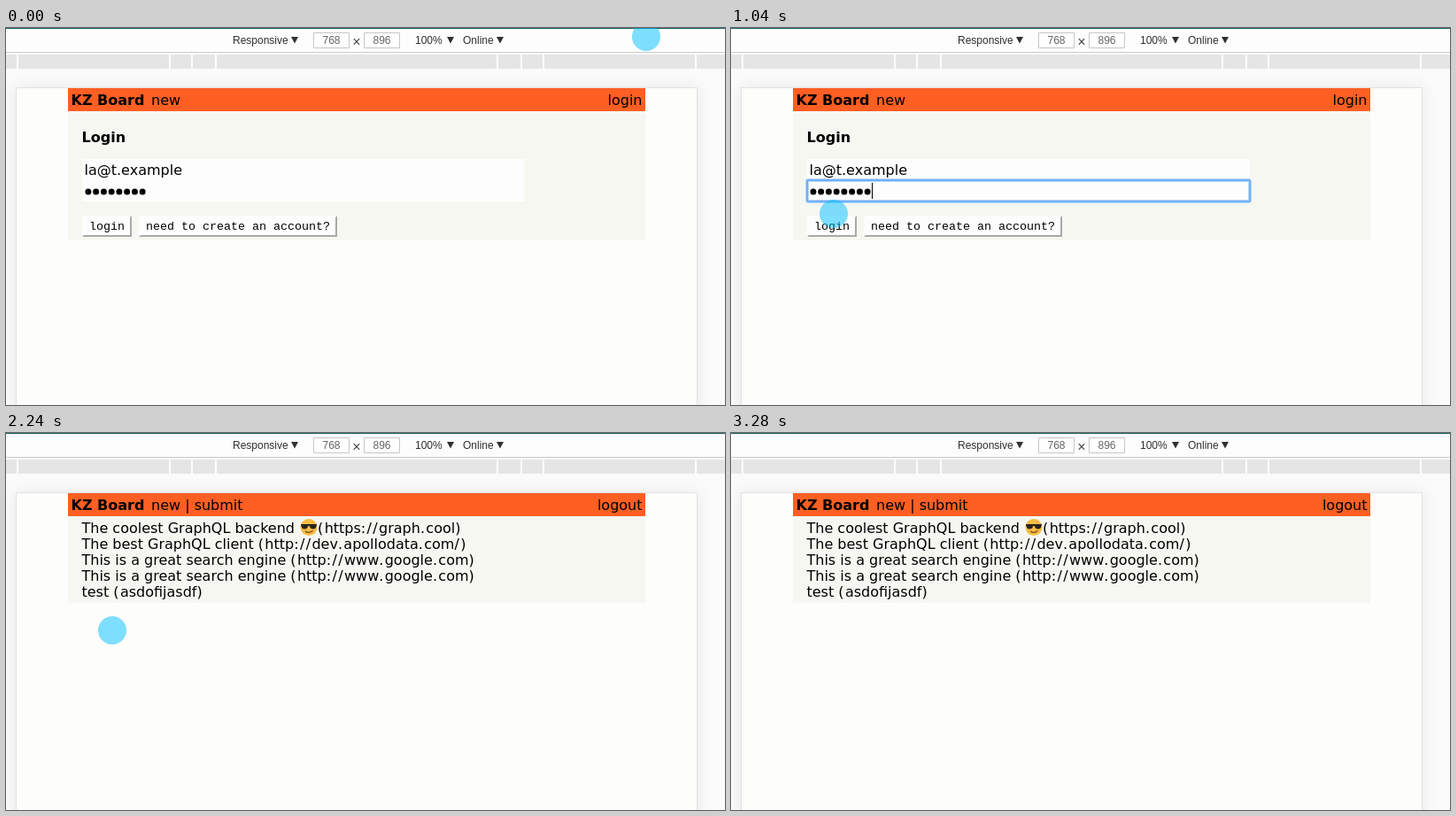
Write an HTML page that moves like this. It is 812 px wide and 426 px high and loops after 3.92 s.

```html
<!DOCTYPE html>
<html lang="en">
<head>
<meta charset="utf-8">
<title>Login demo</title>
<style>
  html, body { margin: 0; width: 100%; height: 100%; overflow: hidden; background: #fbfbfb; }
  svg { display: block; width: 812px; height: 426px; }
  text { font: 16px "DejaVu Sans", sans-serif; white-space: pre; }
  .bold { font-weight: bold; }
  .end { text-anchor: end; }
  .mark { letter-spacing: 1.35px; }
  .bar text { font: 12px "Liberation Sans", Arial, sans-serif; fill: #303030; }
  .bar .size { fill: #666; text-anchor: middle; }
  .bar .times { font-size: 16px; fill: #444; text-anchor: middle; }
  .button text { font: 13.333px "Liberation Mono", monospace; }
  .device { fill: #fdfdfb; stroke: #e2e2e2; filter: drop-shadow(0 0 9px rgba(0, 0, 0, .08)); }
  .solid { fill: rgba(0, 191, 255, .5); }
  .ring { fill: none; stroke: rgba(0, 191, 255, .3); stroke-width: 2.5px; }
</style>
</head>
<body>
<svg viewBox="0 0 812 426">
  <rect width="812" height="426" fill="#fbfbfb"/>
  <rect class="device" x="11.5" y="67.5" width="769" height="420"/>

  <g class="bar">
    <rect width="812" height="46" fill="#fdfdfd"/>
    <rect width="812" height="1" fill="#1d6670"/>
    <rect y="27" width="812" height="1" fill="#cbcbcb"/>
    <rect y="30" width="812" height="16" fill="#e5e5e5"/>
    <g id="ticks" fill="#fdfdfd"></g>
    <text x="256" y="18">Responsive</text>
    <text x="462" y="18">100%</text>
    <text x="516" y="18">Online</text>
    <path d="M322 10h8l-4 7.5zM498 10h8l-4 7.5zM554 10h8l-4 7.5z" fill="#303030"/>
    <path d="M347.5 5.5h40v17h-40zM404.5 5.5h40v17h-40z" fill="#fff" stroke="#c6c6c6"/>
    <text class="size" x="367.5" y="18">768</text>
    <text class="times" x="396" y="21">×</text>
    <text class="size" x="424.5" y="18">896</text>
  </g>

  <rect x="70" y="68" width="652" height="26" fill="#ff5f22"/>
  <text class="bold" x="73.5" y="87">KZ Board</text>

  <g id="form">
    <text x="164" y="87">new</text>
    <text class="end" x="718.5" y="87">login</text>
    <rect x="70" y="94" width="652" height="146" fill="#f7f7f2"/>
    <text class="bold" x="85.5" y="129">Login</text>
    <rect x="86" y="148" width="500" height="48" fill="#fdfdfd"/>
    <text x="88.5" y="166">la@t.example</text>
    <g id="focus">
      <rect x="86" y="172" width="500" height="24" rx="1.5" fill="#fdfdfd" stroke="#b5d6fb" stroke-width="4"/>
      <rect x="86" y="172" width="500" height="24" rx="1" fill="none" stroke="#70b0f6" stroke-width="2"/>
      <rect x="159" y="175" width="1" height="18"/>
    </g>
    <g id="dots"></g>
    <g id="buttons" class="button"></g>
  </g>

  <g id="list">
    <text x="164" y="87">new | submit</text>
    <text class="end" x="718.5" y="87">logout</text>
    <rect x="70" y="94" width="652" height="98" fill="#f7f7f2"/>
    <g id="links"></g>
    <g transform="translate(342 106.5)">
      <circle r="9.5" fill="#f5bd45"/>
      <path d="M-9-3.500H9Q8.500 2 5 2T.8-1.500H-.8Q-1.500 2-5 2T-9-3.500Z" fill="#2a2420"/>
      <path d="M-4 4.500Q0 7.500 4.500 4" fill="none" stroke="#7b4a12" stroke-width="1.3"/>
    </g>
  </g>

  <circle id="pointer"/>
</svg>
<script>
  const LOOP = 3920, STEP = 80, CLICK_LENGTH = 240;
  const FIELD_CLICK = 640, BUTTON_CLICK = 1440, PAGE_CHANGE = 2240;
  const byId = id => document.getElementById(id);
  const [form, list, focusRing, pointer] = ["form", "list", "focus", "pointer"].map(byId);

  function setAttrs(node, attrs) {
    for (const key in attrs) node.setAttribute(key, attrs[key]);
  }

  function add(parent, tag, attrs, text = "") {
    const node = document.createElementNS("http://www.w3.org/2000/svg", tag);
    setAttrs(node, attrs);
    node.textContent = text;
    return parent.appendChild(node);
  }

  // The ruler is symmetric about the middle of the device.
  for (const offset of [159, 186, 211, 383])
    for (const side of [-1, 1])
      add(byId("ticks"), "rect", { x: 395 + side * offset, y: 30, width: 2, height: 16 });

  for (let i = 0; i < 8; i++)
    add(byId("dots"), "circle", { cx: 92.9 + i * 8.75, cy: 185, r: 3.5 });

  function addButton(x, label) {
    const group = byId("buttons"), width = label.length * 8 + 16;
    add(group, "rect", { x, y: 212, width, height: 24, fill: "#fdfdfd" });
    add(group, "path", {
      d: `M${x} 236l2-2h${width - 4}v-20l2-2v24z`, fill: "#a9a9a9"
    });
    add(group, "text", { x: x + 8, y: 228 }, label);
  }
  addButton(86, "login");
  addButton(150, "need to create an account?");

  // Punctuation is set a little wider; "@" leaves room for the emoji.
  function addLink(line, row) {
    const text = add(byId("links"), "text", { x: 85.5, y: 113 + row * 18 });
    let gap = 0;
    for (const part of line.split(/(@|[(:/.)]+)/)) {
      if (part === "@") gap = 21;
      else if (part) {
        add(text, "tspan", { dx: gap, class: /^\W+$/.test(part) ? "mark" : "" }, part);
        gap = 0;
      }
    }
  }
  [
    "The coolest GraphQL backend @(https://graph.cool)",
    "The best GraphQL client (http://dev.apollodata.com/)",
    "This is a great search engine (http://www.google.com)",
    "This is a great search engine (http://www.google.com)",
    "test (asdofijasdf)"
  ].forEach(addLink);

  const path = [
    { at: 0, x: 723, y: 10 },
    { at: 560, x: 207, y: 200 },
    { at: 800, x: 207, y: 200 },
    { at: 1040, x: 116, y: 210 },
    { at: 1200, x: 109, y: 222 },
    { at: 2160, x: 109, y: 222 },
    { at: 2240, x: 120, y: 223 },
    { at: 2560, x: 798, y: 77 },
    { at: 2640, x: 850, y: 60 }
  ];

  const ease = p => p * p * (3 - 2 * p);
  const mix = (a, b, p) => a + (b - a) * p;

  function position(t) {
    const next = path.findIndex(point => point.at > t);
    if (next < 0) return path.at(-1);
    const a = path[next - 1], b = path[next];
    const p = ease((t - a.at) / (b.at - a.at));
    return { x: mix(a.x, b.x, p), y: mix(a.y, b.y, p) };
  }

  const show = (node, on) => node.style.display = on ? "" : "none";

  function draw(ms) {
    const t = Math.floor(ms % LOOP / STEP) * STEP;
    const { x, y } = position(t);
    const click = [FIELD_CLICK, BUTTON_CLICK].find(at => t >= at && t < at + CLICK_LENGTH);
    setAttrs(pointer, {
      cx: x, cy: y,
      r: click ? mix(19, 16, (t - click) / CLICK_LENGTH) : 16,
      class: click ? "ring" : "solid"
    });
    show(form, t < PAGE_CHANGE);
    show(list, t >= PAGE_CHANGE);
    show(focusRing, t >= FIELD_CLICK + STEP && t < BUTTON_CLICK + STEP);
  }

  const start = performance.now();
  function tick() {
    draw(performance.now() - start);
    requestAnimationFrame(tick);
  }
  tick();
</script>
</body>
</html>
```
